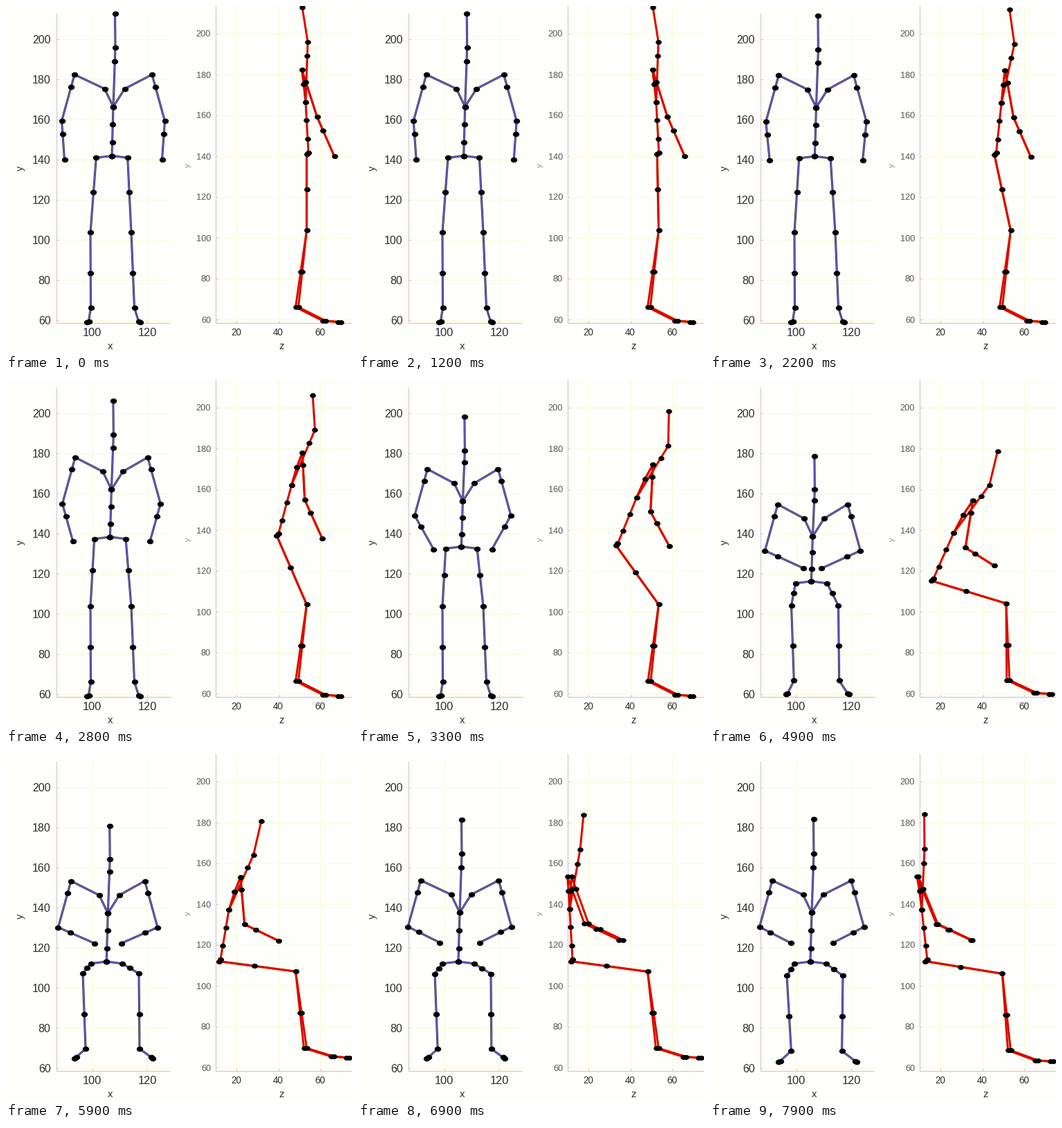
Animation, 500 px wide and 500 px high, one loop 8 s. Source, as a matplotlib script:

```python
import numpy as np
import matplotlib.pyplot as plt
from matplotlib.animation import FuncAnimation
from matplotlib.path import Path

SIZE, FRAMES, STEP = 500, 80, 100
PT = 0.72  # points per pixel at 100 dpi
PAPER, GRID, SPINE = "#fefefb", "#fcfad2", "#d9bccb"
LEVELS = range(200, 59, -20)


def ramp(t, a, b):
    """Smooth step from 0 at time a to 1 at time b."""
    s = np.clip((t - a) / (b - a), 0, 1)
    return s * s * (3 - 2 * s)


def swing(t, start, go, out, back=0, home=(7, 8)):
    """Move by `go` during `out`, then by `back` during `home`."""
    return start + go * ramp(t, *out) + back * ramp(t, *home)


def point(x, y, z):
    return np.array([x, y, z], float)


def bone(base, length, tilt, x):
    """End of a bone leaning in the side view; tilt is the sine."""
    return point(x, base[1] - length * np.sqrt(1 - tilt**2),
                 base[2] + length * tilt)


def mix(a, b, f):
    return a + (b - a) * f


def arm(t, s, chest, nod):
    twist = swing(t, 0, -6, (5.9, 6.9), 4, (6.9, 7.9)) if s > 0 else 0
    width = swing(t, 56, -6, (1.1, 4.1), 7, (4.4, 7.5))
    reach = swing(t, 22, -34, (1, 4.4), 40, (4.6, 7.4))
    fold = swing(t, 4, 52, (1.9, 4.9), -11, (5, 7.4))
    drop = swing(t, 56, -33, (2.4, 5.4))
    ahead = swing(t, 25, 25, (2.6, 6.4))

    shoulder = chest + point(s * width, -46.5, 47 * (1.25 * nod - 0.16) + twist)
    collar = chest + point(2 + s * 14.5, -26, (shoulder[2] - chest[2]) / 2)
    elbow = shoulder + point(s * 18.5, 67, reach)
    hand = elbow + point(-s * fold, drop, ahead)
    return [chest, collar, shoulder, mix(shoulder, elbow, 0.26), elbow,
            mix(elbow, hand, 0.34), hand]


def leg(t, s, pelvis):
    spread = ramp(t, 4.2, 5.8)
    lift = swing(t, 0, 1, (4.6, 5.8), -0.32, (6.7, 8))
    slide = 12 * ramp(t, 3, 5.5) - 2 * s

    hip = pelvis + point(s * 22.7, 2.8, -2.5)
    knee = point(151.5 + s * (29.5 + 11 * spread), 327.3 - 10 * lift,
                 swing(t, 434.5, -16, (4.2, 5.8), 4))
    ankle = point(154 + s * (31.5 + 7.5 * lift), 436 - 10 * lift, 420.5 + slide)
    toe = point(155.5 + s * (38.5 + 18 * spread), 457 - 17.5 * lift, 482 + slide)
    ball = toe + point(-2.5 * s, -1.5, -22)
    return [pelvis, hip, mix(hip, knee, 0.46), knee,
            mix(knee, ankle, 0.54), ankle, ball, toe]


def pose(t):
    """Sitting down: trunk, both arms and both legs as chains of x, y, z."""
    drift = -8 * ramp(t, 0.5, 6.5)
    lean = swing(t, -0.056, 0.535, (1.1, 4.1), -0.59, (4.2, 7.5))
    nod = swing(t, 0.035, 0.6, (1.1, 4.1), -0.59, (4.4, 8))
    gaze = swing(t, -0.16, 0.4, (1.8, 5), -0.25, (5.6, 8))

    pelvis = point(153 + drift, swing(t, 216.5, 83.5, (2, 5.65)),
                   swing(t, 437, -127, (0.8, 5.9), 4))
    chest = bone(pelvis, 71, lean, 155 + drift)
    neck = bone(chest, 86, nod, 158 + drift)
    head = bone(neck, 49.5, gaze, 157.5 + drift)
    trunk = [head, neck, mix(neck, chest, 0.235), chest,
             mix(chest, pelvis, 0.36), mix(chest, pelvis, 0.73), pelvis]
    chains = [trunk]
    for s in (-1, 1):
        chains += [arm(t, s, chest, nod), leg(t, s, pelvis)]
    return [np.array(c) for c in chains]


def side_y(y):
    return 40 + (y - 48) * 1.0185


plt.rcParams["font.family"] = "Liberation Sans"
fig = plt.figure(figsize=(5, 5), dpi=100, facecolor=PAPER)
ax = fig.add_axes([0, 0, 1, 1])
ax.set(xlim=(0, SIZE), ylim=(SIZE, 0))
ax.axis("off")


def rule(x, y, color):
    ax.plot(x, y, color=color, lw=PT, zorder=1)


def label(x, y, s, px, color="#2c2c2c", ha="center", turn=0):
    ax.text(x, y, s, fontsize=px * PT, color=color, ha=ha, rotation=turn,
            va="center" if turn else "center_baseline")


def panel(x0, x1, y0, xticks, top, gap, px, ink, xpx):
    base = 457.5
    for s, x in xticks.items():
        rule([x, x], [y0, base], GRID)
        rule([x, x], [base - 3, base], SPINE)
        label(x, 471, s, xpx)
    for i, s in enumerate(LEVELS):
        y = top + gap * i
        rule([x0, x1], [y, y], GRID)
        rule([x0, x0 + 3], [y, y], SPINE)
        label(x0 - px / 2, y, s, px, ink, "right")
    rule([x0, x0], [y0, base], SPINE)
    rule([x0, x1], [base, base], SPINE)


panel(72.5, 237, 11, {100: 124.5, 120: 204}, 48, 58, 16, "#2c2c2c", 16.4)
panel(302.5, SIZE, 0, {20: 333, 40: 393.5, 60: 454}, 40, 59, 12.8, "#555555", 13.5)
label(151, 491, "x", 15)
label(398, 491, "z", 15)
label(21, 235, "y", 14, turn=90)
label(263, 230, "y", 11, "#8a8a7a", turn=90)

ring = np.linspace(0, 2 * np.pi, 25)
OVAL = Path(np.column_stack([np.cos(ring), 0.82 * np.sin(ring)]))


def strokes(color, px, z):
    return [ax.plot([], [], color=color, lw=px * PT, zorder=z,
                    solid_joinstyle="round")[0] for _ in range(5)]


def dots(px):
    return ax.plot([], [], ls="", marker=OVAL, ms=px * PT, color="black",
                   mew=0, zorder=5)[0]


front = strokes("#2a2546", 3, 2), strokes("#7468dc", 1.4, 3)
profile = strokes("#e8b866", 3.4, 2), strokes("#dd0000", 2.7, 3)
front_dots, side_dots = dots(9.4), dots(8.6)


def draw(n):
    chains = pose(n * STEP / 1000)
    for i, c in enumerate(chains):
        x, y, z = c.T
        for layer in front:
            layer[i].set_data(x, y)
        for layer in profile:
            layer[i].set_data(z, side_y(y))
    x, y, z = np.vstack(chains).T
    front_dots.set_data(x, y)
    side_dots.set_data(z, side_y(y))
    return [*front[0], *front[1], *profile[0], *profile[1], front_dots, side_dots]


anim = FuncAnimation(fig, draw, frames=FRAMES, interval=STEP,
                     repeat=True, repeat_delay=0, blit=False)
plt.show()
```
